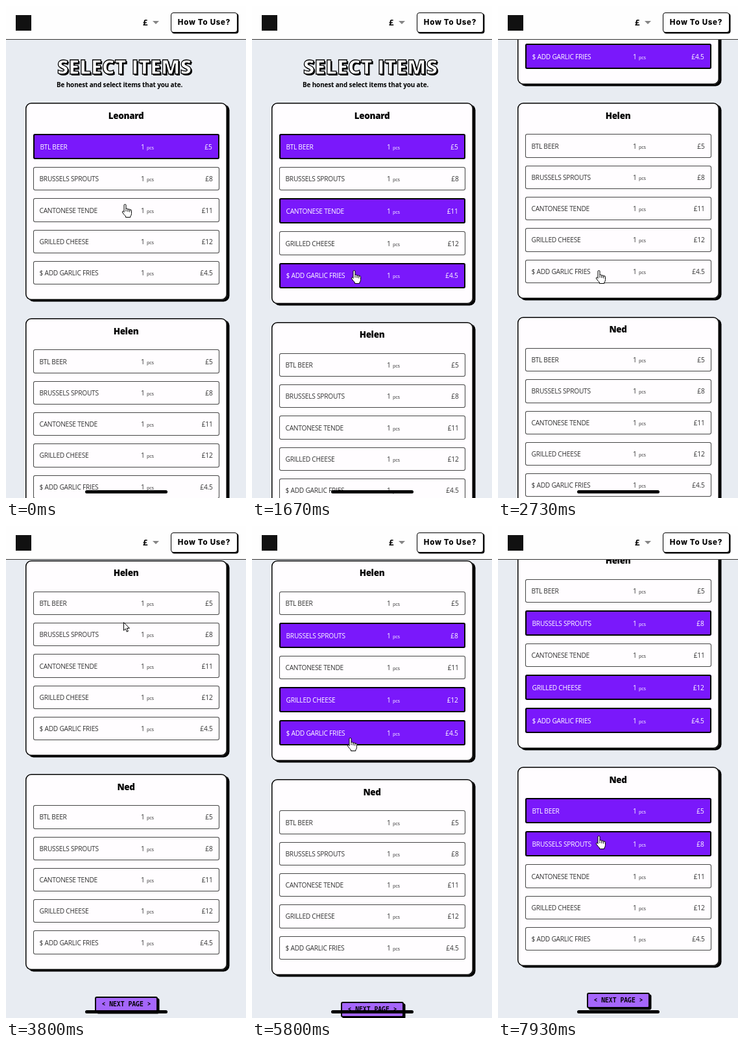
Animation, 370 px wide and 758 px high, one loop 8 s. Source, as an HTML page:

```html
<!DOCTYPE html>
<html lang="en">
<head>
<meta charset="utf-8">
<title>Select items</title>
<style>
  * { box-sizing: border-box; }
  html, body { margin: 0; width: 100%; height: 100%; overflow: hidden; }
  body { position: relative; background: #e8ecf2; font-family: "Open Sans", "Noto Sans", sans-serif; color: #000; }
  body > *, header > *, #page > * { position: absolute; white-space: nowrap; }

  header { left: 0; top: 0; width: 370px; height: 52px; background: #fefefe; border-bottom: 1px solid #333; }
  .logo { left: 15px; top: 14px; width: 24px; height: 24px; background: #111; }
  .currency { left: 211px; top: 15px; font: 700 13px/20px "Open Sans", sans-serif; }
  .caret { left: 226px; top: 23px; border: 5px solid transparent; border-top-color: #858585; border-bottom: 0; }
  .help { left: 254px; top: 10px; width: 103px; height: 31px; background: #fff; border: 1px solid #000; border-radius: 4px;
    box-shadow: 1.5px 1.5px 0 #000; text-align: center; font: 800 11.5px/29px Inter, sans-serif; letter-spacing: .75px; }

  #page { left: 0; top: 0; width: 370px; }
  h1 { left: 79px; top: 74px; margin: 0; font-size: 30px; line-height: 40px; font-weight: 800; letter-spacing: .3px;
    color: #fff; -webkit-text-stroke: 1.3px #000; text-shadow: 2px 2px 0 #000; }
  .sub { left: 78px; top: 111px; font-size: 9.9px; line-height: 20px; font-weight: 700; letter-spacing: -.1px; }
  #cards { left: 29.5px; top: 149.2px; width: 311px; }
  .card { margin-bottom: 28px; padding: 48px 12px 12px; position: relative; background: #fffdff;
    border-radius: 9px; box-shadow: inset 0 0 0 1.5px #000, 3.5px 2.5px 0 #000; }
  .card b { position: absolute; left: 0; right: 0; top: 9.5px; text-align: center; font-size: 13.4px;
    line-height: 20px; font-weight: 800; letter-spacing: -.3px; }
  .row { position: relative; display: flex; justify-content: space-between; align-items: center; height: 36.3px;
    margin-bottom: 12px; padding: 0 10px; border-radius: 3px; box-shadow: inset 0 0 0 1px #444;
    color: #333; font-size: 10.2px; letter-spacing: -.25px; }
  .row.on { height: 39px; padding: 0 11px; background: #7a18fb; box-shadow: inset 0 0 0 2px #000; color: #fff; }
  .qty { position: absolute; left: 166.5px; }
  .qty small { font-size: 7.4px; margin-left: 1px; }
  .next { position: relative; margin: 41px 0 0 107.5px; width: 97px; height: 24px; background: #a566fb; border: 2px solid #000;
    border-radius: 3px; box-shadow: 2.5px 2.5px 0 #000; text-align: center;
    font: 600 9.75px/20px "Noto Sans Mono", "DejaVu Sans Mono", monospace; }

  .home { left: 121.5px; top: 746px; width: 127px; height: 5px; border-radius: 3px; background: #000; }
  #cursor { left: 0; top: 0; overflow: visible; fill: #fff; stroke: #000; stroke-linejoin: round; }
</style>
</head>
<body>
<div id="page">
  <h1>SELECT ITEMS</h1>
  <div class="sub">Be honest and select items that you ate.</div>
  <div id="cards"></div>
</div>
<header>
  <div class="logo"></div>
  <div class="currency">£</div>
  <div class="caret"></div>
  <div class="help">How To Use?</div>
</header>
<div class="home"></div>
<svg id="cursor" width="1" height="1">
  <path id="hand" d="M-1.5 12V1.5Q-1.5 0 0 0T1.5 1.5V7.5Q1.5 6.5 3 6.5T4.5 8V9Q4.5 7.3 6 7.3T7.3 9V9.7Q7.3 8.3 8.6 8.3T10 9.8V14Q10 17 8.3 18.5V20H1V18.5Q-1 16.5-4 12.5Q-4.5 11-3.3 10.5Q-2.5 10.3-1.5 12ZM1.5 8V11M4.5 9V11.5M7.3 9.7V12"/>
  <path id="arrow" d="M0 0V12.5L2.8 9.8 4.8 14.5 6.8 13.6 4.9 9H8.8Z"/>
</svg>
<script>
const LOOP = 8000;
const items = [["BTL BEER", "5"], ["BRUSSELS SPROUTS", "8"], ["CANTONESE TENDE", "11"],
  ["GRILLED CHEESE", "12"], ["$ ADD GARLIC FRIES", "4.5"]];
const people = ["Leonard", "Helen", "Ned"];

// [time, person, item]
const clicks = [[0, 0, 0], [400, 0, 2], [1330, 0, 4], [4270, 1, 1], [4930, 1, 3], [5530, 1, 4], [6730, 2, 0], [7470, 2, 1]];
// [time, value...]
const scrollKeys = [[1870, 0], [2330, 175], [2730, 337], [3000, 434], [6130, 434], [6400, 453]];
const cursorKeys = [[0, 183, 305], [500, 183, 306], [1130, 157, 407], [2400, 157, 407], [2730, 155, 407],
  [3130, 155, 407], [3700, 181, 148], [3850, 181, 148], [4150, 172, 166], [4400, 170, 168], [4800, 160, 262],
  [5050, 158, 264], [5430, 151, 326], [6000, 151, 326], [6600, 153, 432], [6850, 153, 434], [7350, 155, 477]];

const $ = id => document.getElementById(id);
const row = ([name, price]) =>
  `<div class="row"><span>${name}</span><span class="qty">1 <small>pcs</small></span><span>£${price}</span></div>`;
$("cards").innerHTML = people.map(name =>
  `<div class="card"><b>${name}</b>${items.map(row).join("")}</div>`).join("") +
  `<div class="next">&lt; NEXT PAGE &gt;</div>`;
const rows = [...document.querySelectorAll(".row")];

function sample(keys, t, ease = u => u) {
  const i = keys.findIndex(k => k[0] > t);
  if (i === 0) return keys[0].slice(1);
  if (i < 0) return keys.at(-1).slice(1);
  const a = keys[i - 1], b = keys[i];
  const u = ease((t - a[0]) / (b[0] - a[0]));
  return a.slice(1).map((v, j) => v + (b[j + 1] - v) * u);
}

const smooth = u => u * u * (3 - 2 * u);

function draw(now) {
  const t = now % LOOP;
  for (const [time, person, item] of clicks)
    rows[person * items.length + item].classList.toggle("on", t >= time);

  const [scroll] = sample(scrollKeys, t);
  $("page").style.top = -scroll + "px";

  const [x, y] = sample(cursorKeys, t, smooth);
  const isArrow = t > 3300 && t < 4000;
  $("cursor").style.transform = `translate(${Math.round(x) + .5}px, ${Math.round(y) + .5}px)`;
  $("hand").style.display = isArrow ? "none" : "";
  $("arrow").style.display = isArrow ? "" : "none";
}

function frame() {
  draw(performance.now());
  requestAnimationFrame(frame);
}
frame();
</script>
</body>
</html>
```
